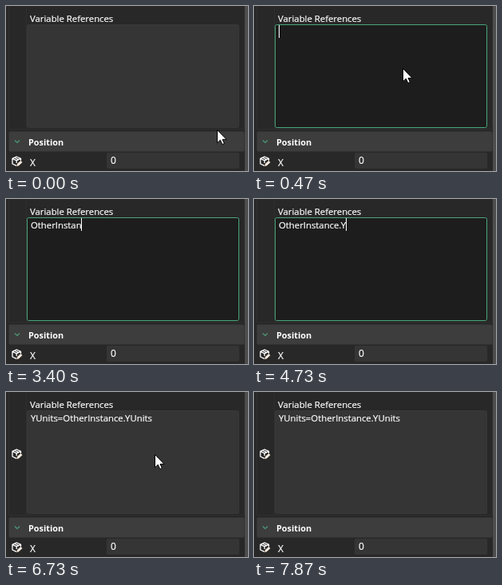
An HTML page for the animation above (8540 ms loop, 303 by 207 pixels).

```html
<!DOCTYPE html>
<html lang="en">
<head>
<meta charset="utf-8">
<title>Variable References</title>
<style>
  html, body { margin: 0; width: 100%; height: 100%; overflow: hidden; background: #282828; }
  svg { display: block; width: 303px; height: 207px; }
  text { font: 11.35px "Open Sans", "Noto Sans", sans-serif; fill: #fff; stroke: #fff; stroke-width: .2; }
  .head { font-size: 10.9px; font-weight: 700; stroke: none; }
  .field { font-size: 12px; }
</style>
</head>
<body>
<svg viewBox="0 0 303 207">
  <defs>
    <g id="cube" fill="none" stroke="#fff" stroke-width="1.3" stroke-linejoin="round" stroke-linecap="round">
      <path d="M5.5 12.2 L1 10 V3.4 L6.2 1 L11.5 3.4 V5.5 M1 3.4 L6.2 5.8 L11.5 3.4 M6.2 5.8 V8.5 M3.6 2.2 L8.8 4.6"/>
      <path d="M6.8 12.4 L7.4 10 L11.4 6.4 L13.2 8.1 L9.2 11.8 Z" fill="#fff" stroke="#eed5b8" stroke-width=".8"/>
    </g>
  </defs>
  <rect width="303" height="207" fill="#282828"/>
  <path d="M3.5 0 V154.5 H298.5 V0 M25.5 0 V154" fill="none" stroke="#2f2f2f"/>
  <rect x="299" width="4" height="207" fill="#4d4d4d"/>

  <text x="30" y="20">Variable References</text>
  <rect id="box" x="26.5" y="23.5" width="265" height="129" rx="2"/>
  <text id="entry" x="31" y="37"></text>
  <rect id="caret" y="24" width="1" height="16" fill="#fff"/>
  <use id="mark" href="#cube" x="7" y="71"/>

  <rect id="header" x="3.5" y="157.5" width="295" height="25" rx="2" stroke="#323232"/>
  <path d="M11 168.5 L14 171.5 L17 168.5" fill="none" stroke="#4c9a76" stroke-width="1.2"/>
  <text class="head" x="28" y="175">Position</text>

  <use href="#cube" x="7" y="188"/>
  <text class="field" x="30" y="201">X</text>
  <rect x="126" y="184" width="166" height="20" rx="2" fill="#353535"/>
  <text class="field" x="131" y="198">0</text>

  <path id="pointer" d="M.5 .5 V16.8 L4.3 13.2 L6.8 18.6 L9.4 17.5 L7 12.4 H12 Z" fill="#fff" stroke="#000"/>
</svg>
<script>
const LOOP = 8540;
const FRAME = 1000 / 15;
const PRESS = 270, FOCUS = 470, BLUR = 6730, END = 7870;
const BLINK = 530;
const HIDE = 1530, RETURN = 6330;

// Each word is typed between two times
const WORDS = [
  ["Other", 1470, 2070],
  ["Instance", 2400, 3670],
  [".", 3870, 3870],
  ["YUnits", 4270, 5870]
];
const PHRASE = WORDS.map(w => w[0]).join("");

const ENTER = [264, 155], REST = [186, 78], LEAVE = [256, 207];

const el = id => document.getElementById(id);
const [box, entry, caret, mark, header, pointer] =
  ["box", "entry", "caret", "mark", "header", "pointer"].map(el);

const clamp = u => Math.min(1, Math.max(0, u));
const mix = (a, b, u) => a.map((v, i) => Math.round(v + (b[i] - v) * u));

function set(node, attrs) {
  for (const name in attrs) node.setAttribute(name, attrs[name]);
}

function show(node, on) {
  node.style.display = on ? "" : "none";
}

// The first letters of a word come slower than the last
function typed(t) {
  return WORDS.map(([word, from, to]) => [...word].filter((_, i) => {
    const u = i / Math.max(1, word.length - 1);
    return t >= from + (to - from) * u ** 0.75;
  }).join("")).join("");
}

// The pointer moves at 15 steps per second
function pointerAt(t) {
  const step = Math.floor((t + 4) / FRAME);
  if (step < 113) return mix(ENTER, REST, 1 - (1 - clamp(step / 4)) ** 1.6);
  return mix(REST, LEAVE, clamp((step - 113) / 5) ** 1.4);
}

function draw(t) {
  const [x, y] = pointerAt(t);
  const visible = t < HIDE || (t >= RETURN && t < END);
  const done = t >= BLUR;
  const focused = t >= FOCUS && !done;
  const hover = visible && y < 153 && (t < FOCUS || t >= BLUR + FRAME);

  set(pointer, { transform: `translate(${x} ${y})` });
  show(pointer, visible);
  set(header, { fill: visible && y > 157 && y < 183 ? "#444" : "#3d3d3d" });

  set(box, {
    fill: focused ? "#1d1d1d" : hover ? "#3a3a3a" : "#353535",
    stroke: t >= PRESS && !done ? "#48a67b" : hover ? "#3d3d3d" : "#383838"
  });

  const text = typed(t);
  entry.textContent = done ? "YUnits=" + PHRASE : text;
  set(caret, { x: 31 + Math.floor(text ? entry.getComputedTextLength() : 0) });
  show(caret, focused && (text || t < FOCUS + BLINK));
  show(mark, done);
}

const start = performance.now();
function tick() {
  draw((performance.now() - start) % LOOP);
  requestAnimationFrame(tick);
}
tick();
</script>
</body>
</html>
```
